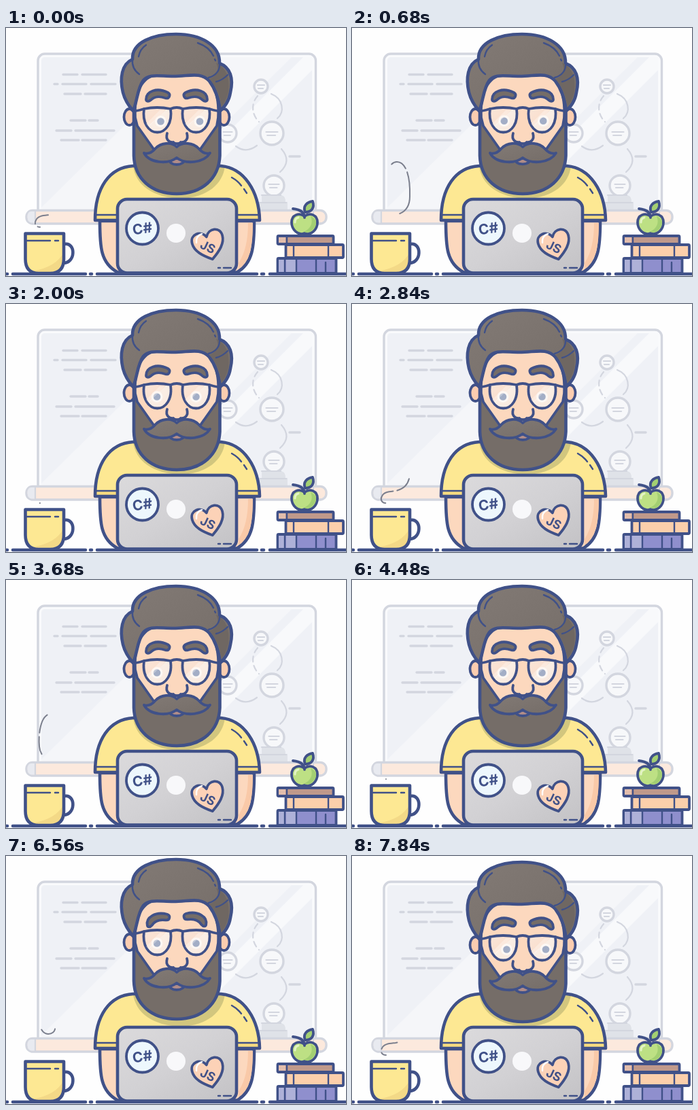
An HTML page for the animation above (8200 ms loop, 500 by 365 pixels).

```html
<!DOCTYPE html>
<html lang="en">
<head>
<meta charset="utf-8">
<title>Developer at a desk</title>
<style>
html, body { margin: 0; width: 100%; height: 100%; overflow: hidden; background: #fefefe; }
svg { display: block; width: 100vw; height: 100vh; }
.ink { stroke: #405188; stroke-width: 4.6; stroke-linecap: round; stroke-linejoin: round; }
.mid { stroke-width: 3.8; }
.thin { stroke-width: 2.4; }
.line { fill: none; }
.board { fill: none; stroke: #d3d6df; stroke-width: 3.4; stroke-linecap: round; stroke-linejoin: round; }
.fine { stroke-width: 2.2; }
.skin { fill: #fcd8be; }
.hair { fill: url(#hair); }
.beard { fill: #756d68; }
.yellow { fill: #fde893; }
text { font: 700 21px Inter, Arial, sans-serif; fill: #405188; text-anchor: middle; }
</style>
</head>
<body>
<svg viewBox="0 0 500 365" preserveAspectRatio="none">
  <defs>
    <linearGradient id="hair" x1="0" y1="0" x2="1" y2="1">
      <stop offset="0" stop-color="#827a75"/><stop offset="1" stop-color="#756d68"/>
    </linearGradient>
    <linearGradient id="metal" x1="0" y1="0" x2="1" y2="1">
      <stop offset="0" stop-color="#dbdadc"/><stop offset=".5" stop-color="#d2d1d4"/><stop offset="1" stop-color="#c3c2c5"/>
    </linearGradient>
    <linearGradient id="glare" x1="0" y1="0" x2="1" y2="1">
      <stop offset="0" stop-color="#fae6d9"/><stop offset=".45" stop-color="#fadfce"/>
      <stop offset=".46" stop-color="#faeee5"/><stop offset="1" stop-color="#fae9de"/>
    </linearGradient>
    <clipPath id="shirtClip"><path d="M131 283C131 235 152 205 187 203H316C350 206 372 240 373 283Z"/></clipPath>
    <clipPath id="mugClip"><path d="M28.500 302.500H85V340Q85 361 65 361H48Q28.500 361 28.500 340Z"/></clipPath>
  </defs>

  <!-- whiteboard -->
  <rect class="board" x="47" y="38" width="408.500" height="240" rx="10" style="fill:#f9fafc"/>
  <rect x="52" y="43" width="398" height="226" rx="5" fill="#eff1f6"/>
  <path d="M52 264L276 43H420L194 268H52Z" fill="#f5f6f9"/>
  <path d="M300 180L437 43H450V62L300 212Z" fill="#f8f9fb"/>
  <g id="notes"></g>
  <path class="board fine" d="M390 97C408 104 410 124 399 133M338 174Q353 185 369 173M405 178Q421 196 403 212"/>
  <path class="board fine" d="M370 100C361 110 360 126 372 138" stroke-dasharray="8 6"/>
  <path class="board" d="M417 189H432"/>
  <g id="nodes"></g>
  <path d="M376 246H404Q411 246 411 256H414V269H370V256H376Z" fill="#dfe2e8"/>
  <path class="board fine" d="M376 246H404M372 257H412"/>
  <rect class="board" x="30" y="268.500" width="441" height="19.500" rx="9" style="fill:#fce9dd"/>
  <path d="M43 270V286.500H38Q31.500 286.500 31.500 278T38 270Z" fill="#e8eaf0"/>
  <path class="board fine" d="M43 269V287M452 269V287"/>

  <path id="steam" pathLength="250" fill="none" stroke="#7b7f8d" stroke-width="2" stroke-linecap="round"
    d="M50 293C44 293 41 288 44 283C47 276 56 276 64 275C79 272 85 262 85 248C86 215 78 197 66 197C52 197 47 225 49 245C50 256 56 262 62 262C69 262 73 257 72 252C71 247 68 245 64 245"/>

  <!-- desk line -->
  <path class="ink line" d="M0 362H2M10 362H117M124 362H126M134 362H369M376 362H379M388 362H500"/>

  <!-- body -->
  <path class="ink skin" d="M138 284C138 322 139 346 164 359.500H340C363 346 365 322 365 284Z"/>
  <path d="M356 287H363C363 318 360 343 342 355V346Q356 325 356 287Z" fill="#f9c9a8"/>
  <path class="yellow" d="M131 283C131 235 152 205 187 203H316C350 206 372 240 373 283Z"/>
  <g clip-path="url(#shirtClip)">
    <path d="M187 203H322C319 230 296 249 258 251C215 250 190 230 187 203Z" fill="#d2c67e"/>
    <path d="M130 276H374V284H130Z" fill="#f7dc80"/>
  </g>
  <path class="ink line" d="M131 283C131 235 152 205 187 203H316C350 206 372 240 373 283Z"/>
  <path class="ink thin line" d="M133 275H163M341 275H371M332 220Q341 225 346 232M350 237L354 243"/>

  <!-- head -->
  <g id="head">
    <ellipse class="ink mid" cx="181.500" cy="131" rx="8" ry="12" fill="#fbcdb0"/>
    <ellipse class="ink mid" cx="320.500" cy="131" rx="8" ry="12" fill="#fbcdb0"/>
    <path class="ink beard" d="M188 118V188C189 222 214 244 251 244S313 222 314.500 188V118Z"/>
    <path class="ink mid skin" d="M190 132C188 88 204 68 228 68H280C304 72 314 96 312 132L310 144L286 178L280 182H222L217 178L193 144Z"/>
    <path class="ink hair" d="M187 122C180 114 175 107 172 95C167 74 170 53 186 46C185 21 216 9 250 9C286 9 315 25 314 52C330 58 335 74 330 95C328 108 322 115 315 122C313 106 309 91 299 78C286 64 270 71 246 71C225 71 210 67 202 77C193 89 193 108 187 122Z"/>
    <path d="M309 51Q331 62 327 94Q323 109 317 115Q312 88 299 75Q317 68 309 51Z" fill="#6f6762"/>
    <path class="ink thin line" d="M186 46C185 56 189 63 196 68M314 52C315 62 309 70 298 73M326 69Q318 77 309 79M282 22Q299 28 305 41M307 46L308 48M195 42Q197 31 206 25"/>
    <g id="browL"><path class="ink mid beard" d="M206 105C206 93 222 87 238 95C243 98 240 105 234 103C226 100 218 101 213 106C209 109 206 108 206 105Z"/></g>
    <g id="browR"><path class="ink mid beard" d="M296 105C296 93 280 87 264 95C259 98 262 105 268 103C276 100 284 101 289 106C293 109 296 108 296 105Z"/></g>
    <g id="specs">
      <path class="ink mid" fill="url(#glare)" d="M203 119Q222 115 242 119C245 140 235 153.500 222.500 153.500S200 140 203 119Z"/>
      <path class="ink mid" fill="url(#glare)" d="M260 119Q280 115 299 119C302 140 292 153.500 279.500 153.500S257 140 260 119Z"/>
      <g id="pupils">
        <circle cx="222" cy="136.500" r="8.500" fill="#fff" opacity=".6"/>
        <circle cx="279.500" cy="136.500" r="8.500" fill="#fff" opacity=".6"/>
        <circle cx="222" cy="136.500" r="5.300" fill="#a3aec6"/>
        <circle cx="279.500" cy="136.500" r="5.300" fill="#a3aec6"/>
      </g>
      <path d="M206 141L226 121H234L210 145ZM263 141L283 121H291L267 145Z" fill="#fff" opacity=".3"/>
      <path class="ink mid line" d="M191 122Q197 121 203 119M242 119Q251 115 260 119M299 119Q305 121 311 122"/>
    </g>
    <path class="ink mid skin" d="M237 155C234 165 241 169 246 168C248 171 255 171 257 168C262 169 269 165 266 155"/>
    <path class="ink mid" id="mouth" d="M238 192Q251 189 265 192Q261 201 251 201T238 192Z" fill="#b08c88"/>
    <path class="ink mid hair" d="M251 175C243 167 228 169 220 177C215 183 209 186 203 184C211 199 238 201 251 191C264 201 291 199 300 184C294 186 288 183 283 177C275 169 260 167 251 175Z"/>
  </g>

  <!-- laptop -->
  <rect class="ink" x="164" y="252" width="175" height="108.500" rx="14" fill="url(#metal)"/>
  <path class="ink thin line" d="M312 353H315M320 353H331"/>
  <circle cx="250" cy="302" r="14" fill="#f8f8fa"/>
  <circle class="ink mid" cx="200.500" cy="295" r="23.500" fill="#edf7fd"/>
  <text transform="translate(201.500 302.500) rotate(-8)">C#</text>
  <g transform="translate(298 319)">
    <path class="ink mid" transform="rotate(-15)" fill="#fcd2b7" d="M0 22C-13 13 -23 4 -23 -8C-23 -22 -6 -24 0 -12C6 -24 23 -22 23 -8C23 4 13 13 0 22Z"/>
    <path d="M-18 -3Q-19 -13 -10 -16" fill="none" stroke="#fff" stroke-width="2.500" stroke-linecap="round"/>
    <text transform="translate(-4 9) rotate(25)" style="font-size:18px">JS</text>
  </g>

  <!-- mug -->
  <path class="ink line" d="M86 318C103 315 103 347 83 346"/>
  <g clip-path="url(#mugClip)">
    <path class="yellow" d="M28 302H86V362H28Z"/>
    <path d="M85 330Q74 352 38 358L45 362H86Z" fill="#f3d987"/>
  </g>
  <path class="ink line" d="M28.500 302.500H85V340Q85 361 65 361H48Q28.500 361 28.500 340Z"/>
  <path class="ink thin line" d="M31 313H65M72 313H77"/>

  <!-- books and fruit -->
  <rect class="ink mid" x="399.500" y="306" width="82" height="12" rx="1.500" fill="#c0998b"/>
  <path d="M401 308H411V316H401Z" fill="#e2bdac"/>
  <rect class="ink mid" x="411.500" y="319" width="84.500" height="19" rx="1.500" fill="#fccfab"/>
  <path class="ink thin line" d="M413 307V317M423 320V337M474 320V337"/>
  <rect class="ink mid" x="399.500" y="339" width="86" height="22" rx="1.500" fill="#8f8fcd"/>
  <path d="M401 341H409V359H401ZM412 341H426V359H412Z" fill="#aeb1d8"/>
  <path class="ink thin line" d="M410 340V360M427 340V360M456 340V360M470 345V360"/>
  <path class="ink mid" fill="#bde084" d="M439 277C431 271 420 275 420 286C420 297 430 306 439 302C448 306 458 297 458 286C458 275 447 271 439 277Z"/>
  <path d="M448 277Q454 292 438 300Q448 303 454 293T448 277Z" fill="#a3cf72"/>
  <path d="M425 286Q425 280 430 279" fill="none" stroke="#e4f4c6" stroke-width="3" stroke-linecap="round"/>
  <path class="ink mid line" d="M439 279Q439 268 422 266"/>
  <path class="ink mid" fill="#a3cf72" d="M440 271C436 262 443 256 451 255C454 264 450 271 440 271Z"/>
</svg>
<script>
const LOOP = 8200, LAST = 7840, STEP = 40, PUFF = 2600, LENGTH = 250;
const el = id => document.getElementById(id);
const clamp = x => Math.min(1, Math.max(0, x));
const ease = x => x < .5 ? 2 * x * x : 1 - 2 * (1 - x) ** 2;
const ramp = (t, from, to) => ease(clamp((t - from) / (to - from)));
const move = (id, x, y, extra = "") => el(id).setAttribute("transform", `translate(${x} ${y}) ${extra}`);

// y, then start and end of each dash
const notes = [
  [68.5, 84, 105, 112, 147], [82.5, 71, 76, 83, 118, 125, 161], [97, 86, 110, 116, 147],
  [136, 95, 117, 122, 135], [151, 74, 96, 102, 159], [165, 81, 107, 112, 147]
];
el("notes").innerHTML = notes.map(([y, ...xs]) => {
  let d = "";
  for (let i = 0; i < xs.length; i += 2) d += `M${xs[i]} ${y}H${xs[i + 1]}`;
  return `<path class="board" d="${d}"/>`;
}).join("");

const nodes = [[375, 86, 10], [391, 155, 17], [326, 155, 13], [394, 232, 15]];
el("nodes").innerHTML = nodes.map(([x, y, r]) =>
  `<circle class="board" cx="${x}" cy="${y}" r="${r}" style="fill:#f7f8fa"/>
   <path class="board fine" d="M${x - r * .5} ${y - 2}H${x + r * .5}M${x - r * .4} ${y + 3}H${x + r * .3}"/>`).join("");

function drawSteam(t) {
  const phase = (t + 720) % PUFF;
  const head = LENGTH * ramp(phase, 60, 2500);
  const tail = LENGTH * ramp(phase, 900, 2560);
  const rest = head - 33 - tail;
  const start = rest > 0 ? tail : Math.max(tail, head - 27);
  const dashes = rest > 0 ? [rest, 6, 27, 999] : [Math.max(.01, head - start), 999];
  el("steam").setAttribute("stroke-dasharray", dashes.join(" "));
  el("steam").setAttribute("stroke-dashoffset", -start);
}

function draw(t) {
  const lift = ramp(t, 4480, 5120) - ramp(t, 6840, 7480);
  const right = 1 - ramp(t, 200, 1000) + ramp(t, 7440, 7800);
  move("head", 0, -4 * lift);
  move("specs", 0, -4 * lift);
  move("pupils", 5.5 * right, right);
  move("browL", 0, -2 * lift, `rotate(${-12 * lift} 222 98)`);
  move("browR", 0, -3 * lift, `rotate(${12 * lift} 280 98)`);
  move("mouth", 0, Math.max(right, lift) - 1);
  drawSteam(t);
}

function frame() {
  const t = Math.min(LAST, performance.now() % LOOP);
  draw(Math.floor(t / STEP) * STEP);
  requestAnimationFrame(frame);
}
frame();
</script>
</body>
</html>
```
